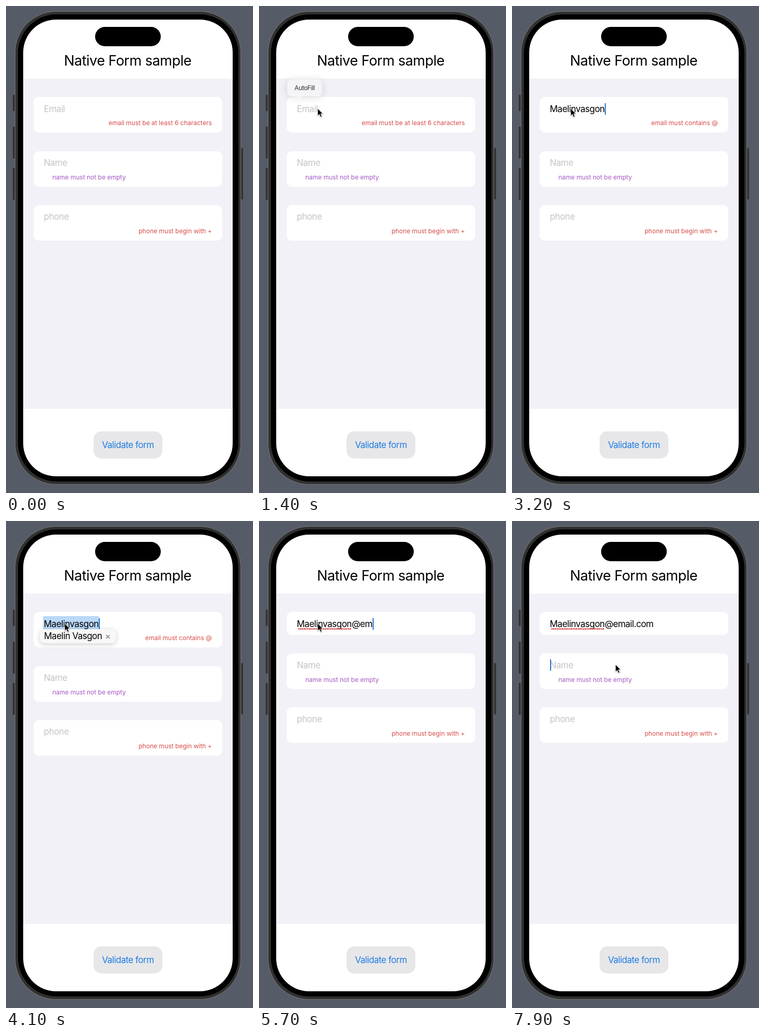
Recreate the animation shown at these times as an HTML page. Size 474 by 932 pixels, loop 8 s.

```html
<!DOCTYPE html>
<html lang="en">
<head>
<meta charset="utf-8">
<title>Native Form sample</title>
<style>
  html, body { margin: 0; width: 100%; height: 100%; overflow: hidden; background: #565c67; }
  body { position: relative; font: 17px/24px Inter, sans-serif; letter-spacing: -.03em; color: #000; white-space: pre; }
  div, svg, .caret, .dots { position: absolute; box-sizing: border-box; }
  .side { width: 6px; background: #343434; }
  .frame { left: 17px; top: 10px; width: 434px; height: 906px; border-radius: 79px; background: #303031; border: 1px solid #77746f; }
  .bezel { left: 23px; top: 16px; width: 423px; height: 894px; border-radius: 74px; background: #000; }
  .screen { left: 33px; top: 26px; width: 402px; height: 874px; border-radius: 63px; background: #fff; }
  .body { left: 33px; top: 139px; width: 402px; height: 632px; background: #f2f1f7; }
  .island { left: 171px; top: 40px; width: 126px; height: 37px; border-radius: 19px; background: #000; }
  .title { left: 33px; top: 85px; width: 401px; line-height: 40px; font-size: 27px; text-align: center; }
  .button { left: 168px; top: 814px; width: 132px; height: 52px; border-radius: 15px; background: #e7e7e9; color: #217ce2; line-height: 52px; text-align: center; }
  .card { left: 53px; width: 362px; height: 68px; border-radius: 10px; background: #fff; }
  .input { left: 19.5px; top: 10px; }
  .hint { color: #c5c5c7; }
  .error { left: 36px; right: 20px; top: 38px; font-size: 12px; letter-spacing: 0; color: #d64c48; text-align: right; }
  .purple { color: #a557c4; text-align: left; }
  .caret { width: 2px; height: 22px; margin-top: 1px; background: #2679cf; }
  #selection { left: 71px; top: 182px; height: 25px; background: #bad8f8; color: transparent; padding-left: 2px; }
  .dots { left: 2px; right: 1px; top: 18px; height: 3px; background: radial-gradient(circle, #d23c3c 1.15px, transparent 1.5px) 0 0 / 3.4px 3px; }
  .user { position: relative; }
  #suggestion { left: 65px; top: 207px; height: 27px; line-height: 27px; padding: 0 27px 0 8px; border-radius: 9px; background: #f8f8f8; box-shadow: 0 2px 10px #0003; }
  #suggestion svg { right: 11px; top: 9.5px; }
  #autofill { left: 54px; top: 140px; width: 67px; height: 33px; border-radius: 8px; background: #f4f4f6; box-shadow: 0 2px 16px #0002; font-size: 12.2px; line-height: 33px; text-align: center; color: #333; }
  #autofill svg { left: 14px; top: 33px; }
  #pointer { left: 0; top: 0; overflow: visible; filter: drop-shadow(0 1px 1px #0005); }
</style>
</head>
<body>
<div class="side" style="left:13px;top:170px;height:31px"></div>
<div class="side" style="left:13px;top:231px;height:61px"></div>
<div class="side" style="left:13px;top:310px;height:61px"></div>
<div class="side" style="left:449px;top:272px;height:98px"></div>
<div class="frame"></div>
<div class="bezel"></div>
<div class="screen"></div>
<div class="body"></div>
<div class="island"></div>
<div class="title">Native Form sample</div>
<div class="button">Validate form</div>

<div class="card" id="email" style="top:174.3px"><div class="error" id="emailError"></div></div>
<div id="selection">Maelinvasgon</div>
<div class="input" style="left:72.5px;top:184.5px"><span class="hint" id="emailHint">Email</span><span class="user"><span id="user"></span><span class="dots" id="dots"></span></span><span id="domain"></span><span class="caret" id="emailCaret"></span></div>
<div class="card" id="name" style="top:277.8px"><div class="input hint">Name<span class="caret" id="nameCaret" style="left:.5px"></span></div><div class="error purple">name must not be empty</div></div>
<div class="card" id="phone" style="top:381.4px"><div class="input hint">phone</div><div class="error">phone must begin with +</div></div>

<div id="suggestion">Maelin Vasgon<svg width="9" height="9" stroke="#777" stroke-width="1.4"><path d="M1 1L8 8M8 1L1 8"/></svg></div>
<div id="autofill">AutoFill<svg width="17" height="7" fill="#f4f4f6"><path d="M0 0H17Q13 1 10.5 4.500Q8.500 7 6.500 4.500Q4 1 0 0"/></svg></div>
<svg id="pointer" width="12" height="19"><path d="M0 0V14.300L3.300 11.300L5.600 16.500L8.200 15.400L6 10.300H10.300Z" stroke="#fff" stroke-width="1"/></svg>

<script>
const LOOP = 8000, USER_LENGTH = 12;
const address = 'Maelinvasgon@email.com';
// [time, characters typed]
const keys = [[1500, 1], [1600, 2], [1700, 3], [1900, 4], [2000, 6], [2800, 8], [3000, 10], [3200, 12],
  [4400, 13], [5700, 15], [5900, 16], [6000, 18], [6300, 19], [6500, 20], [6600, 22]];
const blinks = [[2300, 2500], [4000, 4100], [5200, 5400], [6900, 7100], [7700, 7900]];

const el = id => document.getElementById(id);
const within = (t, from, to) => t >= from && t < to;
const ramp = (t, from, to) => Math.min(1, Math.max(0, (t - from) / (to - from)));
const ease = x => x * x * (3 - 2 * x);
const mix = (a, b, x) => a + (b - a) * x;
const fade = (id, opacity) => el(id).style.opacity = opacity;

function draw(t) {
  const typed = address.slice(0, keys.reduce((n, [time, count]) => t >= time ? count : n, 0));
  el('user').textContent = typed.slice(0, USER_LENGTH);
  el('domain').textContent = typed.slice(USER_LENGTH);
  el('emailHint').style.display = typed ? 'none' : '';
  el('emailError').textContent = typed.length > 6 ? 'email must contains @' : 'email must be at least 6 characters';
  fade('emailError', 1 - ramp(t, 4400, 4700));
  fade('dots', +(typed.length > USER_LENGTH));

  const caretOn = !blinks.some(([from, to]) => within(t, from, to));
  fade('emailCaret', +(caretOn && within(t, 1500, 7450)));
  fade('nameCaret', +(caretOn && t >= 7450));

  const suggested = ramp(t, 3400, 3650) * (1 - ramp(t, 4400, 4550));
  fade('suggestion', suggested);
  fade('selection', suggested);
  fade('autofill', ramp(t, 1250, 1400) * (1 - ramp(t, 1480, 1700)));

  const lift = 24.4 * ease(ramp(t, 4400, 4900));
  el('email').style.height = 68 - lift + 'px';
  for (const id of ['name', 'phone']) el(id).style.transform = `translateY(${-lift}px)`;

  const enter = ease(ramp(t, 100, 900)), leave = ease(ramp(t, 7000, 7200));
  const x = mix(mix(435, 112.5, enter), 198.5, leave);
  const y = mix(mix(897, 196, enter), 274.5, leave);
  el('pointer').style.transform = `translate(${x}px, ${y}px)`;
  fade('pointer', +(t >= 100));
}

function tick() {
  draw(performance.now() % LOOP);
  requestAnimationFrame(tick);
}
tick();
</script>
</body>
</html>
```
